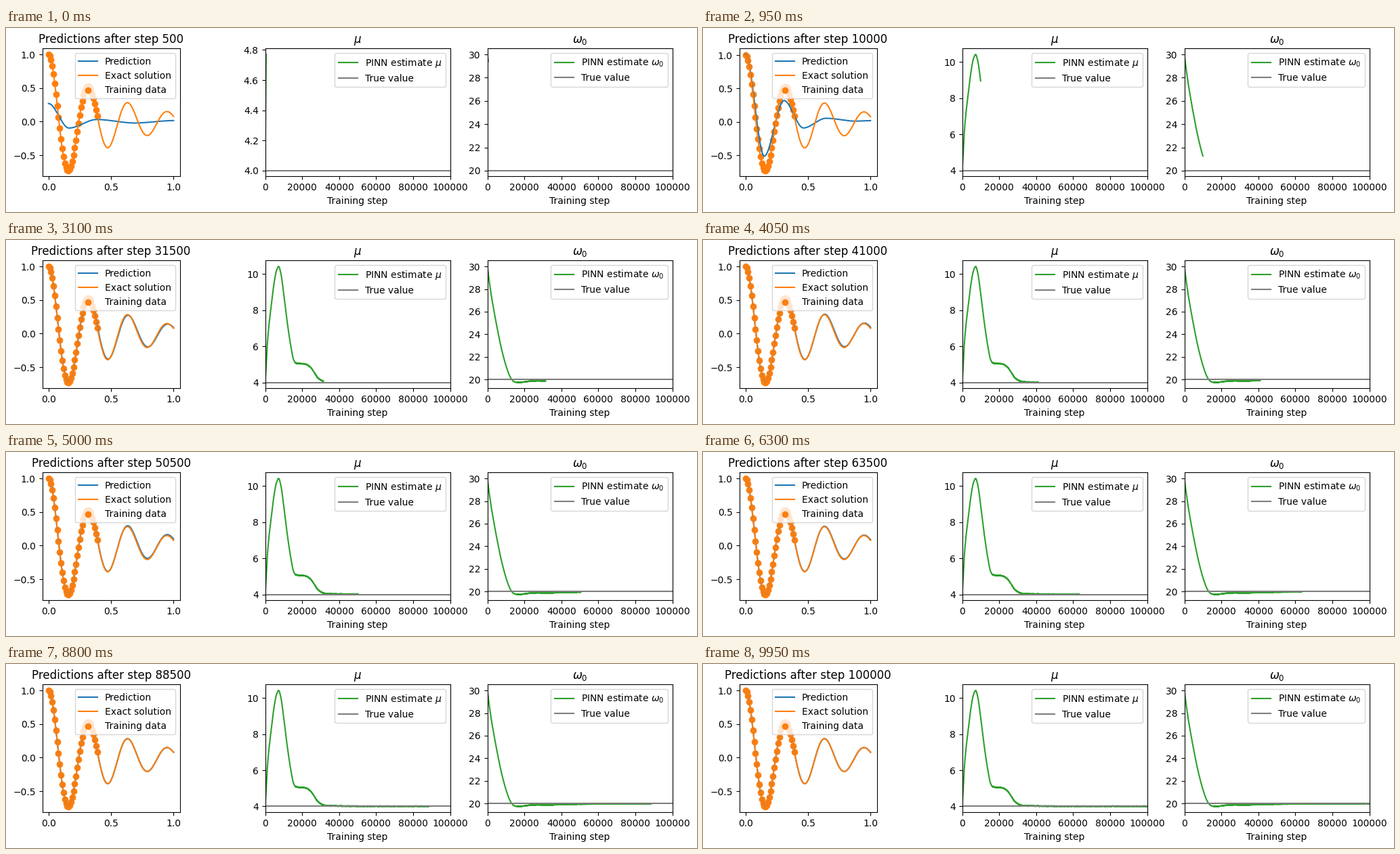
Recreate the animation shown at these times as a matplotlib script. Size 1020 by 272 pixels, loop 10000 ms.

```python
import numpy as np
import matplotlib.pyplot as plt
from matplotlib.animation import FuncAnimation

WIDTH, HEIGHT, DPI = 1020, 272, 100
FRAMES, INTERVAL, STEPS_PER_FRAME = 200, 50, 500
LAST_STEP = FRAMES * STEPS_PER_FRAME
TRUE_MU, TRUE_OMEGA = 4, 20

MU_KEYS = [
    (0, 4.0), (500, 4.77), (1100, 6.0), (1900, 7.0), (3000, 8.0),
    (4700, 9.4), (6200, 10.2), (7300, 10.41), (8400, 10.08), (10000, 8.95),
    (12000, 7.3), (14000, 5.95), (15400, 5.27), (16500, 5.09), (18500, 5.05),
    (21500, 5.03), (24200, 4.88), (26000, 4.65), (28500, 4.27), (30000, 4.15),
    (31500, 4.08), (33500, 4.035), (38000, 4.025), (50000, 4.012),
    (LAST_STEP, 4.008),
]
OMEGA_KEYS = [
    (0, 30), (500, 29.4), (1000, 28.75), (2000, 27.6), (3660, 26.0),
    (5500, 24.4), (7300, 22.97), (10000, 21.27), (12000, 20.35),
    (13200, 20.0), (14500, 19.81), (16800, 19.745), (20000, 19.79),
    (24000, 19.87), (28000, 19.89), (31500, 19.87), (40000, 19.92),
    (50500, 19.95), (75000, 19.98), (LAST_STEP, 19.99),
]
# Network output at the start of training and while the damping is overestimated.
FIRST_SHAPE = [(0, 0.27), (0.163, -0.095), (0.385, 0.032), (0.69, -0.02), (1, 0.016)]
DAMPED_SHAPE = [(0, 1.01), (0.15, -0.51), (0.308, 0.32), (0.463, -0.09),
                (0.644, 0.055), (0.88, 0.012), (1, 0.02)]


def monotone_curve(keys, x):
    """Cubic interpolation through the keys without overshoot."""
    kx, ky = np.array(keys, float).T
    h = np.diff(kx)
    d = np.diff(ky) / h
    slope = np.zeros_like(kx)
    same = d[:-1] * d[1:] > 0
    w1, w2 = 2 * h[1:] + h[:-1], h[1:] + 2 * h[:-1]
    slope[1:-1][same] = ((w1 + w2)[same]
                         / (w1[same] / d[:-1][same] + w2[same] / d[1:][same]))
    if kx[-1] > 1:
        slope[0], slope[-1] = d[0], d[-1]
    i = np.clip(np.searchsorted(kx, x, side="right") - 1, 0, len(h) - 1)
    u = (x - kx[i]) / h[i]
    return (ky[i] * (1 + 2 * u) * (1 - u) ** 2
            + ky[i + 1] * u ** 2 * (3 - 2 * u)
            + h[i] * u * (1 - u) * (slope[i] * (1 - u) - slope[i + 1] * u))


def smoothstep(a, b, x):
    u = np.clip((x - a) / (b - a), 0, 1)
    return u * u * (3 - 2 * u)


def oscillator(t, mu, omega0):
    delta = mu / 2
    omega = np.sqrt(omega0 ** 2 - delta ** 2)
    return np.exp(-delta * t) * (np.cos(omega * t) + delta / omega * np.sin(omega * t))


t = np.linspace(0, 1, 300)
t_data = np.arange(40) / 100
exact = oscillator(t, TRUE_MU, TRUE_OMEGA)
first_shape = monotone_curve(FIRST_SHAPE, t)
damped_shape = monotone_curve(DAMPED_SHAPE, t)

SAMPLE = 50
steps = np.arange(0, LAST_STEP + 1, SAMPLE)
mu_smooth = monotone_curve(MU_KEYS, steps)
omega_smooth = monotone_curve(OMEGA_KEYS, steps)
rng = np.random.default_rng(3)
jitter = 0.009 * smoothstep(13000, 17000, steps)
mu_values = mu_smooth + jitter * rng.standard_normal(len(steps))
omega_values = omega_smooth + jitter * rng.standard_normal(len(steps))


def prediction(step):
    if step <= 10000:
        rate = 2500
        blend = ((1 - np.exp(-(step - 500) / rate))
                 / (1 - np.exp(-9500 / rate)))
        return first_shape + blend * (damped_shape - first_shape)
    k = step // SAMPLE
    fitted = oscillator(t, mu_smooth[k], omega_smooth[k])
    blend = smoothstep(10000, 15500, step)
    drift = 0.016 * smoothstep(32000, 48000, step) * (1 - smoothstep(48000, 77000, step))
    return (damped_shape + blend * (fitted - damped_shape)
            + drift * smoothstep(0.4, 0.65, t))


# The small surplus keeps the pixel size from being rounded down.
fig = plt.figure(figsize=((WIDTH + 0.01) / DPI, (HEIGHT + 0.01) / DPI),
                 dpi=DPI, facecolor="white")


def add_axes(left, right):
    return fig.add_axes([left / WIDTH, 52.5 / HEIGHT,
                         (right - left) / WIDTH, 189 / HEIGHT])


def add_estimate(left, right, symbol, true_value):
    ax = add_axes(left, right)
    line, = ax.plot([], [], color="tab:green", label=f"PINN estimate {symbol}")
    ax.plot([0, LAST_STEP], [true_value] * 2, color="tab:gray", label="True value")
    ax.set_xlim(0, LAST_STEP)
    ax.set_title(symbol)
    ax.set_xlabel("Training step")
    ax.legend(loc="upper right")
    return ax, line


ax_fit = add_axes(53.5, 256.5)
fit_line, = ax_fit.plot(t, first_shape, color="tab:blue", label="Prediction")
ax_fit.plot(t, exact, color="tab:orange", label="Exact solution")
ax_fit.scatter(t_data, oscillator(t_data, TRUE_MU, TRUE_OMEGA),
               color="tab:orange", label="Training data")
ax_fit.set_xlim(-0.05, 1.05)
ax_fit.legend(loc="upper right")
title = ax_fit.set_title("")

ax_mu, mu_line = add_estimate(382.5, 655.5, r"$\mu$", TRUE_MU)
ax_omega, omega_line = add_estimate(710.5, 983.5, r"$\omega_0$", TRUE_OMEGA)


def update(frame):
    step = (frame + 1) * STEPS_PER_FRAME
    shown = slice(0, step // SAMPLE + 1)
    title.set_text(f"Predictions after step {step}")
    curve = prediction(step)
    fit_line.set_ydata(curve)
    mu_line.set_data(steps[shown], mu_values[shown])
    omega_line.set_data(steps[shown], omega_values[shown])
    low, high = exact.min(), max(1, curve.max())
    margin = 0.05 * (high - low)
    ax_fit.set_ylim(low - margin, high + margin)
    for ax in (ax_mu, ax_omega):
        ax.relim()
        ax.autoscale_view(scalex=False)
    return fit_line, mu_line, omega_line, title


anim = FuncAnimation(fig, update, frames=FRAMES, interval=INTERVAL,
                     repeat=True, repeat_delay=0, blit=False)
plt.show()
```
